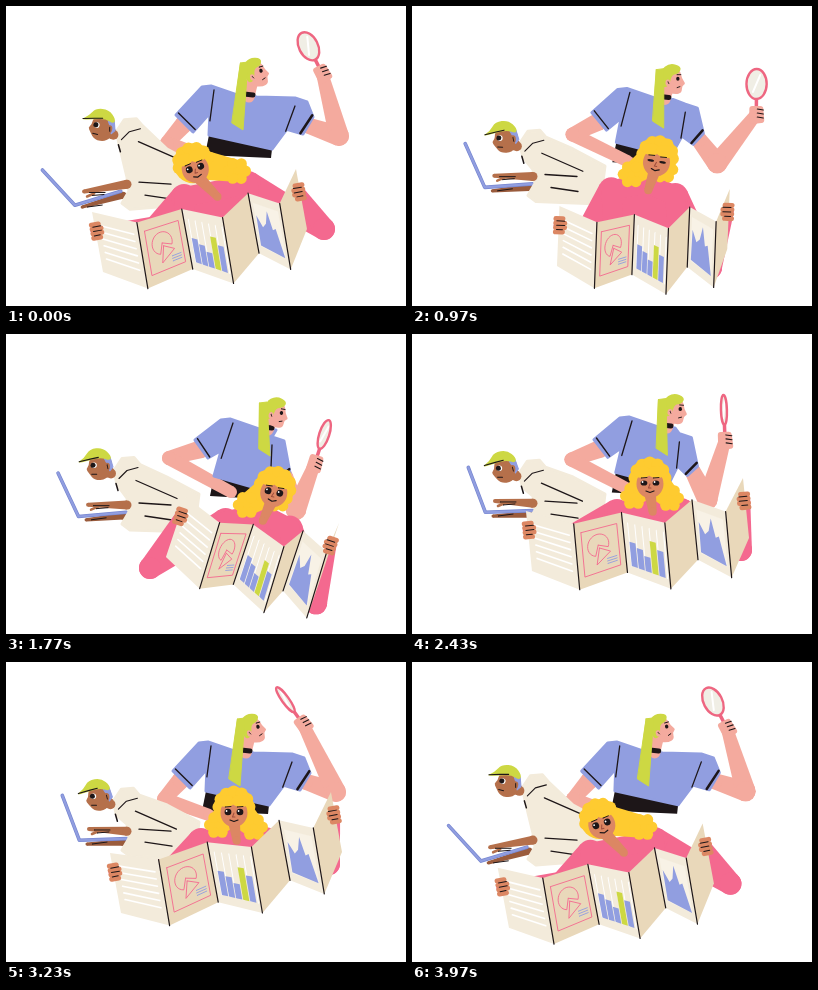
An HTML page with a canvas for the animation above (4010 ms loop, 400 by 300 pixels).

```html
<!DOCTYPE html>
<html>
<head>
<meta charset="utf-8">
<style>
html, body { margin: 0; width: 100%; height: 100%; overflow: hidden; background: #fff; }
canvas { display: block; width: 400px; height: 300px; }
</style>
</head>
<body>
<canvas id="stage" width="400" height="300"></canvas>
<script>
const ctx = document.getElementById('stage').getContext('2d');
const LOOP = 4010, TIMES = [0, 630, 1330, 1770, 2430, 3230];
const BLACK = '#1d1618', BLUE = '#919ee0', LIME = '#cdd843', PINK = '#f4698f', PALE = '#f4aa9e',
  TAN = '#dc8763', BROWN = '#b5704b', CREAM = '#f3ebdb', BEIGE = '#e9d8ba', YELLOW = '#fecb30';

// The few controls of the rig, posed at each of TIMES; everything else follows from them.
const CONTROLS = {
  neck: [[243, 91], [250, 92], [256, 95], [262, 96], [255, 94], [240, 91]],
  turn: [1, .45, .35, 0, .2, 1],
  hand: [[316, 67], [336, 94], [345, 121], [309, 129], [313, 106], [297, 62]],
  wand: [-27, -11, 12, 18, -2, -36],
  lens: [9.5, 9.5, 10, 5, 3, 3.5],
  dip: [17, 5, 5, 5, 2, 2],
  face: [[189, 162], [217, 154], [271, 158], [268, 158], [238, 149], [228, 150]],
  sway: [1, 0, -1, -.7, 0, 0],
  eyes: [1, .7, .14, 1, .75, .95],
  mapL: [[86, 206], [121, 198], [173, 198], [180, 163], [114, 177], [104, 191]],
  mapR: [[290, 163], [308, 178], [327, 187], [333, 189], [331, 144], [325, 130]],
  lean: [11, 1, -7, -20, 6, 11]
};

// Periodic cubic through the poses.
function curve(key, t) {
  let i = 5;
  while (TIMES[i] > t) i--;
  const value = j => key((j + 6) % 6);
  const time = j => TIMES[(j + 6) % 6] + LOOP * Math.floor(j / 6);
  const h = time(i + 1) - time(i), u = (t - time(i)) / h;
  const slope = j => h * (value(j + 1) - value(j - 1)) / (time(j + 1) - time(j - 1));
  const a = value(i), b = value(i + 1), m = slope(i), n = slope(i + 1);
  return a + u * (m + u * (3 * (b - a) - 2 * m - n + u * (2 * (a - b) + m + n)));
}
function poseAt(t) {
  const pose = {};
  for (const [name, keys] of Object.entries(CONTROLS))
    pose[name] = Array.isArray(keys[0]) ? [0, 1].map(c => curve(i => keys[i][c], t)) : curve(i => keys[i], t);
  return pose;
}

const mix = (a, b, u) => [a[0] + (b[0] - a[0]) * u, a[1] + (b[1] - a[1]) * u];
const add = (p, x, y) => [p[0] + x, p[1] + y];
const from = p => (x, y) => add(p, x, y);
const polar = (p, r, a) => add(p, r * Math.cos(a), r * Math.sin(a));
const heading = (a, b) => Math.atan2(b[1] - a[1], b[0] - a[0]);
const rad = deg => deg * Math.PI / 180;

function trace(pts) {
  ctx.beginPath();
  pts.forEach(p => ctx.lineTo(...p));
}
function poly(color, pts, round = 0) {
  trace(pts);
  ctx.closePath();
  ctx.fillStyle = ctx.strokeStyle = color;
  ctx.fill();
  if (round) { ctx.lineWidth = round; ctx.stroke(); }
}
function line(color, width, ...pts) {
  trace(pts);
  ctx.strokeStyle = color;
  ctx.lineWidth = width;
  ctx.stroke();
}
// Closed curve that runs through the middles of the sides.
function blob(color, pts) {
  ctx.beginPath();
  pts.forEach((p, i) => {
    const q = pts[(i + 1) % pts.length];
    if (!i) ctx.moveTo(...mix(pts[pts.length - 1], p, .5));
    ctx.quadraticCurveTo(...p, ...mix(p, q, .5));
  });
  ctx.fillStyle = color;
  ctx.fill();
}
function oval(color, [x, y], rx, ry = rx) {
  ctx.beginPath();
  ctx.ellipse(x, y, Math.abs(rx), ry, 0, 0, 7);
  ctx.fillStyle = color;
  ctx.fill();
}
function limb(color, a, b, ra, rb) {
  const n = heading(a, b) + Math.PI / 2;
  poly(color, [polar(a, ra, n), polar(b, rb, n), polar(b, -rb, n), polar(a, -ra, n)]);
  oval(color, a, ra);
  oval(color, b, rb);
}
function place([x, y], angle, draw) {
  ctx.save();
  ctx.translate(x, y);
  ctx.rotate(angle);
  draw();
  ctx.restore();
}

function drawSeeker({ neck, turn, hand, wand, lens }) {
  const at = from(neck);
  const cuffL = at(-73, 10 + 8 * turn), cuffLIn = at(-60 + 4 * turn, 28 + 7 * turn), shoulderL = at(-38, -11);
  const shoulderR = at(16 + 42 * turn, 11 - 6 * turn);
  const cuffR = at(22 + 42 * turn, 43 - 23 * turn), cuffRIn = at(12 + 42 * turn, 50 - 13 * turn);
  const hemL = at(-54 + 14 * turn, 46 - 8 * turn), hemR = at(-5 + 28 * turn, 60 - 8 * turn);
  const pitL = mix(shoulderL, hemL, .55), pitR = mix(shoulderR, hemR, .58);
  const elbowL = at(-99 + 17 * turn, 28 + 18 * turn), elbowR = at(28 + 62 * turn, 80 - 41 * turn);

  poly(BLACK, [hemL, hemR, add(hemR, -1, 9), add(hemL, -4, 20)]);
  limb(PALE, mix(cuffL, cuffLIn, .5), elbowL, 9, 7);
  limb(PALE, elbowL, at(-37, 62), 7, 6);
  limb(PALE, mix(cuffR, cuffRIn, .5), elbowR, 8, 10);
  limb(PALE, elbowR, hand, 10, 6);
  poly(BLUE, [cuffL, add(shoulderL, -9, 1), shoulderL, at(-9, -1), at(8, 0), add(shoulderR, -12, -4),
    shoulderR, cuffR, cuffRIn, pitR, hemR, hemL, pitL, cuffLIn], 3);
  line(BLACK, 1.4, mix(cuffL, shoulderL, .07), mix(cuffLIn, pitL, .13));
  line(BLACK, 2.5, mix(cuffR, shoulderR, .12), mix(cuffRIn, pitR, .16));
  line(BLACK, 1.3, add(shoulderL, 3, 4), add(pitL, 0, 8));
  line(BLACK, 1.3, add(shoulderR, -12, 4), add(pitR, -1, 2));

  const face = at(8, -15 - 7 * turn);
  limb(PALE, neck, add(face, -4, 3), 5.5, 6);
  line(BLACK, 5, at(-5, -3), at(4, -2));
  place(face, rad(10 - 26 * turn), () => {
    blob(PALE, [[-11, -11], [7, -13], [9, -3], [13, 2], [9, 4], [9, 11], [2, 13], [-8, 9]]);
    blob(LIME, [[-11, 4], [-13, -11], [-3, -19], [9, -15], [6, -8], [-1, -7], [-3, 2], [-7, 6]]);
    oval(PALE, [-5, 1], 2.4, 3.2);
    line(BLACK, .8, [-5, 0], [-4, 2]);
    oval(BLACK, [5, -3], 1.7, 2);
    line(BLACK, .9, [4, -7], [8, -7]);
    line(BLACK, .9, [4, 6], [7, 5]);
  });
  const tail = from(add(face, -14, -10)), tip = from(add(face, -11 - 8 * turn, 40 + 14 * turn));
  poly(LIME, [tail(-3, -2), tail(5, -3), tip(5, 1), tip(-6, -6)], 1);

  place(hand, rad(wand), () => {
    line('#ee6681', 3.5, [0, 5], [0, -15]);
    oval('#f0eee5', [0, -30], lens, 15);
    line('#fff', 2, [lens * .35, -39], [-lens * .35, -22]);
    ctx.beginPath();
    ctx.ellipse(0, -30, Math.abs(lens), 15, 0, 0, 7);
    ctx.strokeStyle = '#ee6681';
    ctx.lineWidth = 2.4;
    ctx.stroke();
    poly(PALE, [[-4, -5], [4, -5], [5, 6], [-4, 7]], 6);
    for (let y = -5; y < 7; y += 4) line(BLACK, 1.1, [1, y], [7, y + 1]);
  });
}

function drawTypist({ dip }) {
  const face = [94 + .2 * dip, 137 - .9 * dip], hinge = [74 - .3 * dip, 175.5 + 1.4 * dip];
  const lid = polar(hinge, 48, rad(-108 - 1.45 * dip)), deck = polar(hinge, 48, rad(-dip));
  const at = from(face), cuff = from([121, 173 + .6 * dip]);
  const palm = from(add(mix(hinge, deck, .2), 0, -11)), under = from(add(mix(hinge, deck, .16), 0, 4));

  limb('#9a5b3c', cuff(-4, 6), under(0, 0), 3.5, 1.6);
  line(BLACK, 1, under(5, 0), under(20, -2));
  line('#7686d0', 3.6, lid, hinge, deck);
  line(BLUE, 2.2, lid, hinge, deck);
  poly(CREAM, [at(13, 4), at(21, -8), at(33, -9), at(39, -2), [161, 143], [193, 160], [188, 198],
    cuff(3, 20), cuff(-5, 14), cuff(2, 2), cuff(0, -12), at(16, 18)], 3);
  limb(BROWN, cuff(0, -5), palm(0, 0), 4.5, 2);
  line(BROWN, 2.6, palm(10, 2), palm(3, 5));
  line(BLACK, 1, palm(5, 1), palm(21, 1));
  line(BLACK, 1, palm(8, 4), palm(20, 3));
  line(BLACK, 1.3, cuff(12, -7), cuff(44, -5));
  line(BLACK, 1.3, cuff(18, 6), cuff(45, 10));
  line(BLACK, 1.3, at(35, 14), at(76, 32));
  line(BLACK, 1.1, at(37, 1), at(26, 4), at(18, 12));
  line(BLACK, 1.5, at(15, 17), at(17, 24));

  limb(BROWN, at(4, 3), at(10, 7), 7, 5);
  place(face, rad(dip - 3), () => {
    blob(BROWN, [[-12, -9], [9, -12], [12, 2], [6, 13], [-6, 14], [-12, 7], [-15, 3], [-12, 0]]);
    poly(BLUE, [[3, -8], [9, -9], [12, 0], [9, 4], [6, -3]], 1);
    blob(LIME, [[-25, -2], [-17, -8], [-12, -17], [1, -19], [10, -11], [9, -6], [0, -9], [-11, -6]]);
    line(BLACK, 1.1, [-22, -4], [-11, -7], [-3, -9]);
    oval(BROWN, [6, 0], 3, 4);
    line(BLACK, .9, [6, -2], [7, 2]);
    oval('#fff', [-7, -1], 2.8);
    oval(BLACK, [-8, -1], 2.5);
    line(BLACK, 1, [-9, 8], [-4, 8]);
  });
}

// Six panels: each fold hangs below the line between the two upper corners.
function foldMap({ mapL, mapR, lean }) {
  const drop = [0, 20, 16, 33, 14, 31, 0];
  const top = [0, .22, .44, .64, .765, .92, 1].map((u, i) => add(mix(mapL, mapR, u), 0, drop[i]));
  const bottom = top.map((p, i) => add(p, lean, i % 2 ? 66 : 60));
  return { top, bottom };
}

function drawMap({ top, bottom }) {
  const on = (i, u, v) => mix(mix(top[i], top[i + 1], u), mix(bottom[i], bottom[i + 1], u), v);
  const box = (i, u, v, u2, v2) => [on(i, u, v), on(i, u2, v), on(i, u2, v2), on(i, u, v2)];
  for (let i = 0; i < 6; i++) poly(i % 2 ? BEIGE : CREAM, box(i, 0, 0, 1, 1));

  for (let v = .2; v < .8; v += .11) line('#fff', 1.6, on(0, .14, v), on(0, .88, v));

  line(PINK, .9, ...box(1, .13, .16, .88, .84), on(1, .13, .16));
  const pie = [on(1, .46, .42)];
  for (let a = 1.9; a < 6.8; a += .2) pie.push(on(1, .46 + .22 * Math.cos(a), .42 + .17 * Math.sin(a)));
  line(PINK, .9, ...pie, pie[0]);
  line(PINK, .9, on(1, .48, .47), on(1, .4, .72), on(1, .7, .57), on(1, .48, .47));
  for (const v of [.67, .71, .75]) line(BLUE, .9, on(1, .62, v), on(1, .82, v));

  for (let u = .12; u < 1; u += .165) line('#fff', 1, on(2, u, .15), on(2, u, .86));
  [.4, .33, .24, .51, .4].forEach((h, k) =>
    poly(k == 3 ? LIME : BLUE, box(2, .12 + k * .16, .86 - h, .26 + k * .16, .86)));

  poly('#f8f2e6', box(4, .1, .14, .9, .86));
  poly(BLUE, [[.12, .84], [.14, .34], [.3, .5], [.42, .42], [.52, .2], [.62, .48], [.72, .44], [.88, .86]]
    .map(([u, v]) => on(4, u, v)));
  for (let i = 1; i < 6; i++) line(BLACK, 1.2, top[i], bottom[i]);
}

function drawGrip(at, angle, side) {
  place(at, angle - Math.PI / 2, () => {
    ctx.scale(side, 1);
    for (let k = 0; k < 4; k++) {
      const y = k * 4.4 - 6.6, reach = k % 3 ? 6 : 4;
      line(TAN, 5, [-3, y], [reach, y]);
      if (k) line(BLACK, 1, [-2, y - 2.2], [reach, y - 2.2]);
    }
  });
}

function drawReader(pose) {
  const { face, sway, eyes, mapL, mapR, lean } = pose, at = from(face), tilt = rad(-18 * sway);
  const map = foldMap(pose), chest = at(3 + 22 * sway, 32);
  const grips = [mix(mapL, map.bottom[0], .32), mix(mapR, map.bottom[6], .38)];
  const shoulders = [add(chest, -36, -3), add(chest, 28, -4 - 12 * sway)];
  const elbows = [add(mapL, 28 + 3.2 * lean, 35 - 1.8 * lean), add(mapR, -2 + 30 * sway, 72 - 12 * sway)];
  shoulders.forEach((shoulder, i) => {
    limb(PINK, shoulder, elbows[i], 13, 11);
    limb(PINK, elbows[i], grips[i], 11, 5);
    line(BLACK, 1.1, add(shoulder, 2, 2), add(shoulder, 4, 18));
  });
  poly(PINK, [shoulders[0], add(chest, 0, -10), shoulders[1], add(shoulders[1], 2, 36), add(shoulders[0], 2, 36)], 20);

  const crown = polar(face, 5, tilt - Math.PI / 2);
  const puffs = [at(-16 + 16 * sway, 13 * (1 - Math.max(0, sway))), at(20 + 22 * sway, 15 - 12 * Math.abs(sway))];
  oval(YELLOW, crown, 20);
  for (const puff of puffs) {
    limb(YELLOW, crown, puff, 16, 11);
    for (let a = 0; a < 6; a += 1.05) oval(YELLOW, polar(puff, 8.5, a), 5.5);
  }
  for (let k = 0; k < 7; k++) oval(YELLOW, polar(crown, 15.5, Math.PI + k * .52 + tilt), 6);
  limb(TAN, at(4 * sway, 10), mix(face, chest, .9), 6, 4);
  place(face, tilt, () => {
    oval(TAN, [0, 1], 13.5, 14);
    oval(YELLOW, [-8, -11], 9, 6);
    oval(YELLOW, [7, -11], 10, 6);
    for (const x of [-6, 6]) {
      oval(BLACK, [x, 0], 3.4, Math.max(.6, 3.4 * eyes));
      if (eyes > .5) oval('#fff', [x - 1.4, -1], .9);
      line(BLACK, .9, [x - 3, -5], [x + 3, -5.5]);
    }
    line('#9d4d3d', 1, [0, 1], [-1.5, 5], [1, 5]);
    line(BLACK, 1.2, [-4, 8], [0, 9.5], [4, 8]);
  });
  drawMap(map);
  drawGrip(grips[0], heading(mapL, map.bottom[0]), 1);
  drawGrip(grips[1], heading(mapR, map.bottom[6]), -1);
}

const start = performance.now();
function draw() {
  const pose = poseAt((performance.now() - start) % LOOP);
  ctx.clearRect(0, 0, 400, 300);
  ctx.lineCap = ctx.lineJoin = 'round';
  drawSeeker(pose);
  drawTypist(pose);
  drawReader(pose);
  requestAnimationFrame(draw);
}
draw();
</script>
</body>
</html>
```
